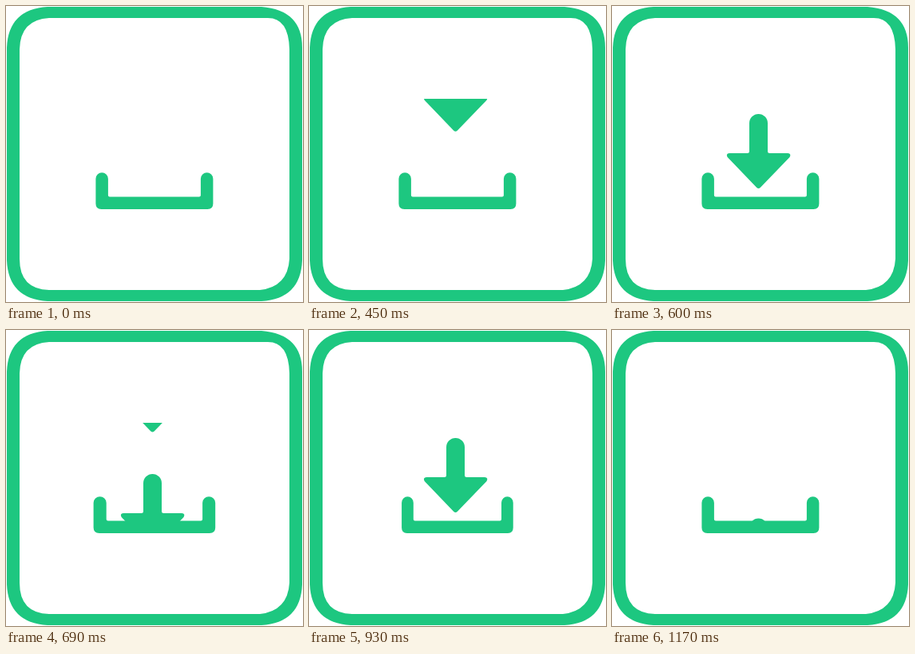
These frames come from a looping animation (372x370 px, 1200 ms). An HTML page:

```html
<!DOCTYPE html>
<html lang="en">
<head>
<meta charset="utf-8">
<title>Download</title>
<style>
  html, body { margin: 0; width: 100%; height: 100%; overflow: hidden; background: #fff; }
  svg { display: block; width: 372px; height: 370px; }
</style>
</head>
<body>
<svg viewBox="0 0 372 370" fill="#1dc780">
  <defs>
    <clipPath id="window"><rect x="90" y="116" width="192" height="124"/></clipPath>
    <!-- Arrow with its tip at y = 0 -->
    <path id="arrow" d="M172-81.5a11.5 11.5 0 0 1 23 0V-46.500q0 2.500 2.500 2.500H220q5 .5 2.500 5L186-1.200q-2.500 2.400-5 0L144.700-39q-2.500-4.500 2.500-5H169.500q2.500 0 2.500-2.500Z"/>
  </defs>
  <path fill-rule="evenodd" d="M52 1H320Q371 5 371 52V318Q369 366 320 369H52Q3 366 1 318V52Q3 4 52 1Z
    M54 15Q18 17 17 54V316Q17 354 54 355H318Q353 351 355 316V54Q354 15 328 15Z"/>
  <path id="tray" d="M-73.500 216a7.750 7.750 0 0 1 15.500 0V236.500q0 2 2 2H56q2 0 2-2V216a7.750 7.750 0 0 1 15.500 0V247q0 7-7 7H-66.500q-7 0-7-7Z"/>
  <g clip-path="url(#window)">
    <use class="arrow" href="#arrow"/>
    <use class="arrow" href="#arrow"/>
  </g>
</svg>
<script>
  const LOOP = 1200, STEP = 30;
  const ARROW_STARTS = [300, 630];
  const TRAVEL = 570;
  // [time, horizontal scale]
  const TRAY_KEYS = [[0, 1], [645, 1], [810, 1.22], [930, 0.95], [1020, 1], [LOOP, 1]];

  const tray = document.getElementById('tray');
  const arrows = document.querySelectorAll('.arrow');

  const tipY = age => 228 + 114 * Math.sin((age - 300) * 0.0045);

  function trayScale(t) {
    const i = TRAY_KEYS.findIndex(key => key[0] > t);
    const [t0, a] = TRAY_KEYS[i - 1], [t1, b] = TRAY_KEYS[i];
    const p = (t - t0) / (t1 - t0);
    return a + (b - a) * (1 - Math.cos(Math.PI * p)) / 2;
  }

  function draw(t) {
    tray.setAttribute('transform', `translate(185.900 0) scale(${trayScale(t)} 1)`);
    arrows.forEach((arrow, i) => {
      const age = t - ARROW_STARTS[i];
      const visible = age >= 0 && age < TRAVEL;
      arrow.setAttribute('visibility', visible ? 'visible' : 'hidden');
      if (visible) arrow.setAttribute('transform', `translate(0 ${tipY(age)})`);
    });
  }

  const start = performance.now();
  function tick() {
    const t = (performance.now() - start) % LOOP;
    draw(Math.floor(t / STEP) * STEP);
    requestAnimationFrame(tick);
  }
  tick();
</script>
</body>
</html>
```
